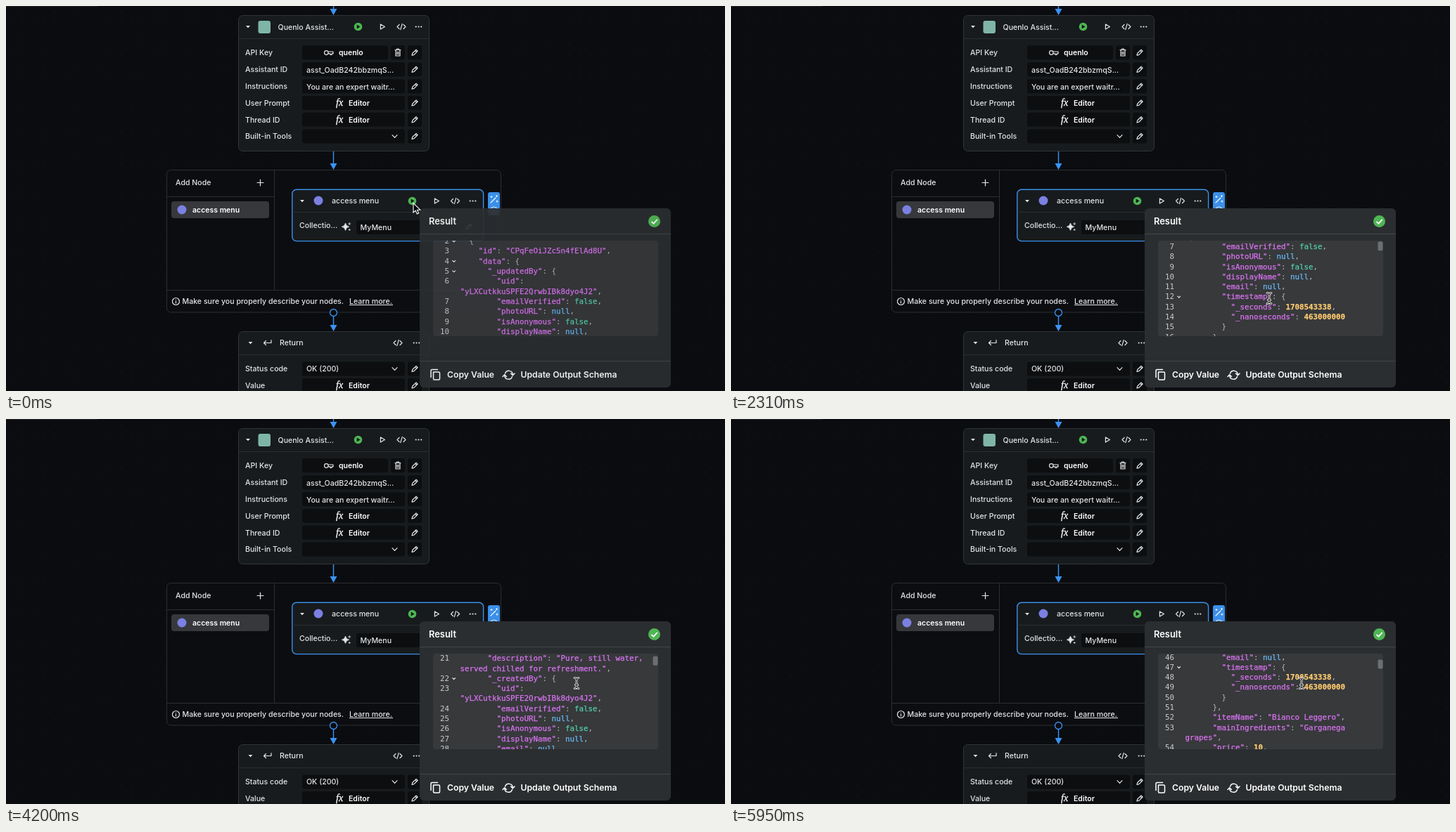
Animation, 1022 px wide and 548 px high, one loop 6370 ms. Source, as an HTML page:

```html
<!DOCTYPE html>
<html lang="en">
<head>
<meta charset="utf-8">
<title>Workflow result</title>
<style>
  html, body { margin: 0; width: 100%; height: 100%; overflow: hidden; background: #0b0c10; }
  svg { display: block; }
  text { font: 500 10.6px Inter, sans-serif; fill: #e4e6e8; }
  .bold { font-weight: 600; fill: #fff; }
  .fx { font: italic 14px "Liberation Serif", serif; fill: #fff; stroke: #fff; stroke-width: .3; }
  .code text { font: 10.8px "DejaVu Sans Mono", monospace; color: #b4b7ba; fill: currentColor; }
  .code .num { color: #c9ccd0; text-anchor: end; }
  .code tspan { fill: currentColor; stroke: currentColor; stroke-width: .25; }
  .str { color: #da74f2; }
  .bool { color: #55cda8; }
  .null { color: #68b8f4; }
  .digit { color: #ffcb70; font-weight: bold; }
  .line { fill: none; stroke: #e4e6e8; stroke-width: 1.2; stroke-linecap: round; stroke-linejoin: round; }
  .thick { stroke: #fff; stroke-width: 1.5; }
  .rule { fill: none; stroke: #2b2e32; }
  .node { fill: #171b1d; stroke: #303538; }
  .field { fill: #0c0e10; }
  .blue { fill: #3b93f5; }
</style>
</head>
<body>
<svg id="stage" width="1022" height="548" viewBox="0 0 1022 548">
  <defs>
    <path id="pencil" class="line" d="M-4 4l.8-3L2-4.1 4.1-2-1 3.2zM.6-2.7L2.7-.6"/>
    <path id="chevron" class="line" d="M-3.5-1.8L0 1.8 3.5-1.8"/>
    <path id="caret" d="M-3-1.5H3L0 1.8z" fill="#e4e6e8"/>
    <path id="play" class="line" d="M-2.6-3.6L3.4 0-2.6 3.6z"/>
    <path id="tags" class="line" d="M-3-3L-6 0-3 3M3-3L6 0 3 3M1.2-4.2L-1.2 4.2"/>
    <path id="dots" d="M-3.8 0h.01M0 0h.01M3.8 0h.01" stroke="#e4e6e8" stroke-width="2.2" stroke-linecap="round"/>
    <g id="run"><circle r="5.800" fill="#4fb654"/><path d="M-1.8-3L3 0-1.8 3z" fill="#101813"/></g>
    <path id="head" class="blue" d="M-5-9H5L0 0z"/>
    <path id="info" class="line" d="M-5 0a5 5 0 1 0 10 0a5 5 0 1 0-10 0M0-.3V2.5M0-2.5v.1"/>
    <path id="bar" d="M-3-7.500Q0-7.500 0-5Q0-7.500 3-7.500M-3 7.500Q0 7.500 0 5Q0 7.500 3 7.500M0-5V5M-1.800 2.500H1.800"/>
    <clipPath id="view"><rect x="607" y="334" width="320" height="136" rx="4"/></clipPath>
    <pattern id="grid" width="15.540" height="15.540" patternUnits="userSpaceOnUse">
      <circle cx="7.800" cy="7.800" r=".600" fill="#1d1f25"/>
    </pattern>
  </defs>

  <rect width="1022" height="548" fill="url(#grid)"/>
  <path d="M0 0H130" stroke="#3a3d40"/>
  <path d="M465.500 0V8M465.500 207V228" stroke="#3b93f5" stroke-width="1.400"/>
  <use href="#head" x="465.500" y="13"/>
  <use href="#head" x="465.500" y="233"/>

  <rect class="node" x="330.500" y="13.500" width="271" height="193" rx="6"/>
  <path class="rule" d="M331 46.500H601"/>
  <rect x="358.500" y="21" width="17.500" height="18" rx="3" fill="#7fb5a5"/>
  <g id="assistant"></g>

  <rect x="228.500" y="233.500" width="475" height="202.500" rx="6" fill="#0c0d11" stroke="#2b2e32"/>
  <path class="rule" d="M229 271.500H381M381.500 234V404M229 404.500H703"/>
  <path class="line" d="M357 251.500h9M361.500 247v9"/>
  <rect x="235" y="278" width="139" height="24" rx="4" fill="#36383b"/>
  <circle cx="250" cy="290" r="6.500" fill="#7b80e2"/>
  <use href="#info" x="241.500" y="420.500"/>
  <path d="M488 425.500H550" stroke="#e4e6e8"/>

  <rect x="406.800" y="261.300" width="271.800" height="73.300" rx="6" fill="#171b1d" stroke="#3b8fea" stroke-width="1.400"/>
  <path class="rule" d="M407 293.500H678"/>
  <circle cx="444" cy="277" r="6.500" fill="#7b80e2"/>
  <path d="M482.500 309q.8 4.600 5.200 5.200q-4.400.6-5.200 5.200q-.8-4.600-5.200-5.200q4.400-.6 5.200-5.200zM488.200 308v4m-2-2h4M488.200 317v3m-1.500-1.500h3" fill="#e4e6e8" stroke="#e4e6e8" stroke-width=".8"/>
  <rect class="field" x="498" y="305" width="146" height="20" rx="3"/>
  <use href="#pencil" x="658" y="314"/>
  <rect x="685" y="265" width="17" height="33" rx="3" fill="#3b8fea"/>
  <path d="M689 280l7-7M698 277v2m-1-1h2M690 270.500v2m-1-1h2M697.500 269.500v2m-1-1h2" stroke="#fff" stroke-width="1.100" stroke-linecap="round"/>
  <use href="#info" x="693.500" y="291"/>

  <path d="M465.500 441V458" stroke="#3b93f5" stroke-width="1.400"/>
  <circle cx="465.500" cy="436.500" r="5" fill="#0b0c10" stroke="#3b93f5" stroke-width="1.300"/>
  <use href="#head" x="465.500" y="463"/>
  <rect class="node" x="330.500" y="463.500" width="271" height="110" rx="6"/>
  <path class="rule" d="M331 496.500H601"/>
  <path class="line" d="M377 475.500v4H366.500m3-3l-3 3 3 3"/>
  <g id="parts"></g>

  <g id="popup">
    <rect x="588" y="288" width="357" height="255" rx="6" fill="#2b2e30"/>
    <path d="M588 324.500H945M588 505.500H945" stroke="#434649"/>
    <circle cx="921.500" cy="306.500" r="8.500" fill="#4fb654"/>
    <path d="M917.500 306.800l2.900 2.900 5.400-5.800" fill="none" stroke="#fff" stroke-width="1.800"/>
    <rect x="607" y="334" width="320" height="136" rx="4" fill="#37393b"/>
    <g clip-path="url(#view)">
      <g id="code" class="code"></g>
      <rect id="thumb" x="919.500" y="334" width="7" height="13" rx="2" fill="#6c6f72"/>
    </g>
    <path class="line thick" d="M607.500 521h7.500q1.500 0 1.500 1.500v8q0 1.500-1.500 1.500h-6q-1.500 0-1.500-1.500zM604 528.500v-9.500q0-1.500 1.500-1.500h8"/>
    <path class="line thick" d="M709.500 523a5.500 5.500 0 0 1 10.700 1.800M717.600 523l2.700 2.600 2.700-2.600M719.500 527.500a5.500 5.500 0 0 1-10.700-1.800M706 527.500l2.700-2.600 2.700 2.600"/>
    <g id="labels"></g>
  </g>

  <path id="arrow" d="M0 0V13.500L3.200 10.600 5.300 15.500 7.600 14.500 5.500 9.700H9.800z" fill="#000" stroke="#fff" stroke-width="1.100"/>
  <g id="beam" fill="none" stroke-linecap="round">
    <use href="#bar" stroke="#fff" stroke-width="2.700"/>
    <use href="#bar" stroke="#111"/>
  </g>
</svg>
<script>
const $ = id => document.getElementById(id);
const label = (x, y, s) => `<text x="${x}" y="${y}">${s}</text>`;
const bold = (x, y, s, size = 10.5) =>
  `<text class="bold" x="${x}" y="${y}" style="font-size:${size}px">${s}</text>`;
const icon = (id, x, y) => `<use href="#${id}" x="${x}" y="${y}"/>`;
const box = (x, y, w) => `<rect class="field" x="${x}" y="${y - 10}" width="${w}" height="20" rx="3"/>`;
const editor = y => `<text class="fx" x="469" y="${y + 3.8}">fx</text>` + bold(487, y + 3.8, 'Editor');
const row = (y, name, value, width = 146) =>
  label(340, y + 3.8, name) + box(421, y, width) + value + box(571, y, 20) + icon('pencil', 581, y);

$('assistant').innerHTML =
  icon('caret', 344, 29.5) + label(386.5, 33.5, 'Quenlo Assist...') + icon('run', 500.5, 29.5) +
  icon('play', 535, 29.5) + icon('tags', 562, 29.5) + icon('dots', 586.5, 29.5) +
  row(66.2, 'API Key', bold(473, 69.8, 'quenlo') + box(547, 66.2, 20) +
    '<path class="line" d="M452.500 66.500a2.800 2.800 0 1 0 5.600 0a2.800 2.800 0 1 0-5.600 0M458 65h7v2.800h-2v1.500h-2v-1.500h-3M553 62.500h8M555.500 62.500v-1.500h3v1.500M554 62.500v8.500h6v-8.500M556 65v4M558 65v4"/>', 122) +
  row(90.3, 'Assistant ID', label(427, 95, 'asst_OadB242bbzmqS...')) +
  row(114.2, 'Instructions', label(427, 119, 'You are an expert waitr...')) +
  row(138, 'User Prompt', editor(138)) +
  row(161.8, 'Thread ID', editor(161.8)) +
  row(185.5, 'Built-in Tools', icon('chevron', 552.5, 185.5));

$('parts').innerHTML =
  label(241, 255.2, 'Add Node') + bold(265, 293.8, 'access menu') +
  label(250.5, 424.2, 'Make sure you properly describe your nodes.') + label(488, 424.2, 'Learn more.') +
  icon('caret', 421, 277.5) + label(463, 281, 'access menu') + icon('run', 577.5, 277.5) +
  icon('play', 612, 277.5) + icon('tags', 638.5, 277.5) + icon('dots', 663.5, 277.5) +
  label(417, 316, 'Collectio...') + label(503.5, 319, 'MyMenu') +
  icon('caret', 347.5, 479.5) + label(389, 483, 'Return') + icon('tags', 557, 479.5) + icon('dots', 583.5, 479.5) +
  row(516.5, 'Status code', label(427, 519.5, 'OK (200)') + icon('chevron', 552.5, 516.5)) +
  row(540, 'Value', editor(540));

$('labels').innerHTML = bold(601, 311, 'Result', 12.9) +
  bold(627, 529.2, 'Copy Value', 12.2) + bold(731.5, 529.2, 'Update Output Schema', 12.2);

// JSON listing; "\n" inside a line is a soft wrap
const user = name => [
  `      "${name}": {`, '        "uid":\n"yLXCutkkuSPFE2QrwbIBk8dyo4J2",',
  '        "emailVerified": false,', '        "photoURL": null,', '        "isAnonymous": false,',
  '        "displayName": null,', '        "email": null,', '        "timestamp": {',
  '          "_seconds": 1708543338,', '          "_nanoseconds": 463000000', '        }', '      },'];
const open = id => ['  {', `    "id": "${id}",`, '    "data": {', ...user('_updatedBy')];
const lines = ['[', ...open('CPqFeOiJZc5n4fElAd8U'),
  '      "itemName": "Still Water",', '      "mainIngredients": "",', '      "price": 2,',
  '      "vegetarian": true,',
  '      "description": "Pure, still water,\nserved chilled for refreshment.",',
  ...user('_createdBy'), '      "category": "Drink"', '    }', '  },',
  ...open('EvmLxAkIoNRZntR1ENNS'),
  '      "itemName": "Bianco Leggero",', '      "mainIngredients": "Garganega\ngrapes",', '      "price": 10,'];

const paint = s => s.replace(/"[^"]*"?|^[a-z][^"]*"|true|false|null|\d+/g, w => {
  const kind = w.includes('"') ? 'str' : w === 'null' ? 'null' : /\d/.test(w) ? 'digit' : 'bool';
  return `<tspan class="${kind}">${w}</tspan>`;
});
const ROW = 14.3, CHAR = 6.5;
let y = 347.8, listing = '';
lines.forEach((line, i) => {
  listing += `<text class="num" x="630" y="${y}">${i + 1}</text>`;
  if (/[[{]$/.test(line)) listing += `<path class="line" d="M634.800 ${y - 4.2}l1.900 1.900 1.900-1.900"/>`;
  for (const part of line.split('\n')) {
    const s = part.trim();
    listing += `<text x="${645.5 + CHAR * part.search(/\S/)}" y="${y}">${paint(s)}</text>`;
    y += ROW;
  }
});
$('code').innerHTML = listing;

const LOOP = 6370, STEP = 70;
// progress of a move whose first and last visible changes are at a and b
const part = (t, a, b) => {
  const p = Math.min(1, Math.max(0, (t - a + STEP) / (b - a + STEP)));
  return p * p * (3 - 2 * p);
};
// [first change, last change, scroll distance]
const scrolls = [[980, 1120, -24], [1890, 2310, 102], [2660, 2940, 163], [3290, 3500, 19],
  [4130, 4760, 191], [4830, 5250, 120], [5600, 5950, 111]];

function draw(now) {
  const t = Math.floor(now % LOOP / STEP) * STEP;
  const scroll = scrolls.reduce((sum, [a, b, d]) => sum + d * part(t, a, b), 24);
  $('code').setAttribute('transform', `translate(0 ${-scroll})`);
  $('thumb').setAttribute('y', 334 + scroll * .012);
  $('popup').setAttribute('opacity', t < 70 ? .93 : t < 140 ? .97 : 1);

  const enter = part(t, 280, 560), shift = part(t, 3710, 3990);
  const x = 583 + 182 * enter + 46 * shift;
  const cy = 288 + 128 * enter - 40 * shift - 100 * shift * (1 - shift);
  const typing = x > 607 && cy > 334;
  $('arrow').style.display = typing ? 'none' : '';
  $('beam').style.display = $('thumb').style.display = typing ? '' : 'none';
  $('arrow').setAttribute('transform', `translate(${x - 4} ${cy - 7.5})`);
  $('beam').setAttribute('transform', `translate(${x} ${cy})`);
  requestAnimationFrame(() => draw(performance.now() - start));
}
const start = performance.now();
draw(0);
</script>
</body>
</html>
```
